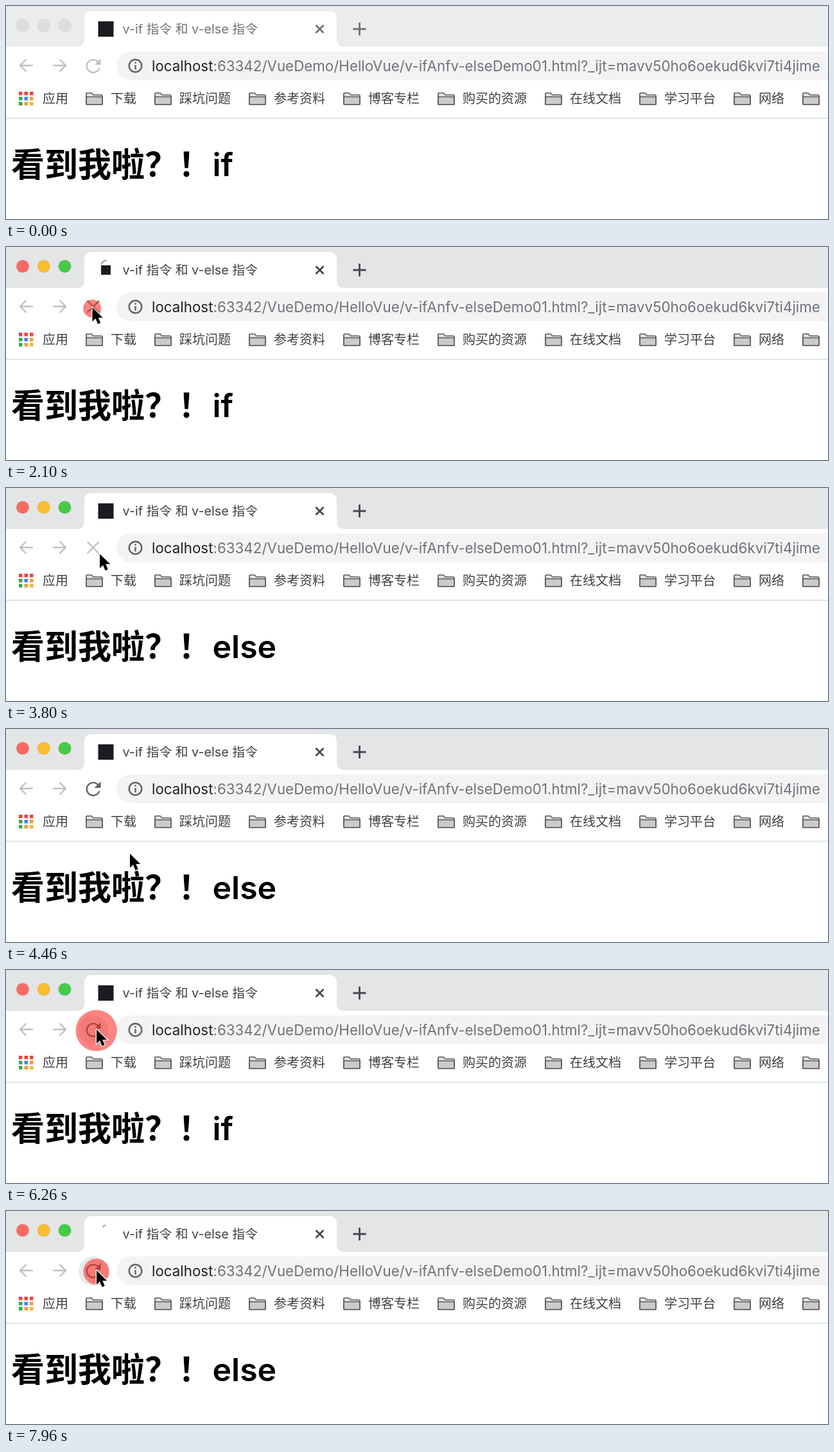
Recreate the animation shown at these times as an HTML page. Size 1280x333 px, loop 8000 ms.

```html
<!DOCTYPE html>
<html lang="zh-CN">
<head>
<meta charset="utf-8">
<title>v-if / v-else</title>
<style>
  html, body { margin: 0; width: 100%; height: 100%; overflow: hidden; background: #fff; }
  svg { display: block; font-family: Inter, "Noto Sans CJK SC", "Noto Sans CJK", sans-serif; }
  text { white-space: pre; }
  .line { fill: none; stroke-width: 2.4; }
  #strip { fill: #ebecee; }
  .light { fill: #dcdddf; stroke: #0001; }
  #tabText { fill: #717376; }
  #tabIcons { stroke: #717376; stroke-width: 2.8; }
  .active #strip { fill: #e4e5e7; }
  .active .light { fill: var(--on); }
  .active #tabText { fill: #3e4145; }
  .active #tabIcons { stroke: #45484c; }
</style>
</head>
<body>
<svg id="stage" width="1280" height="333" viewBox="0 0 1280 333">
  <rect id="strip" width="1280" height="64"/>
  <circle class="light" style="--on:#f96b62" cx="26" cy="30.2" r="9.8"/>
  <circle class="light" style="--on:#fabd2f" cx="58.8" cy="30.2" r="9.8"/>
  <circle class="light" style="--on:#46ca48" cx="91.5" cy="30.2" r="9.8"/>
  <path fill="#fff" d="M110 64q12 0 12-12V20q0-12 12-12H503q12 0 12 12V52q0 12 12 12z"/>
  <rect id="favicon" x="143.5" y="24" width="24" height="24" fill="#1b1b20"/>
  <path id="spinner" class="line" stroke="#a9abae" d="M151 24.9A12 12 0 1 1 150.9 25"/>
  <text id="tabText" x="181.5" y="42.5" font-size="19.8">v-if 指令 和 v-else 指令</text>
  <path id="tabIcons" class="line" d="M482.5 30l12 12m0-12l-12 12M550.5 26v20m-10-10h20"/>

  <g class="line" stroke="#bfc0c2">
    <path d="M42 93H22M31.5 83.5L22 93l9.5 9.5"/>
    <path d="M73 93H93M83.5 83.5L93 93l-9.5 9.5"/>
  </g>
  <circle id="hover" cx="136" cy="94" r="23" fill="#e9eaec"/>
  <g id="reload">
    <path class="line" stroke="currentColor" d="M143.5 87.5A10 10 0 1 0 145.3 97"/>
    <path fill="currentColor" d="M147.5 82V92H137.5z"/>
  </g>
  <path id="stop" class="line" stroke="currentColor" d="M126.5 84l18.5 18.5m0-18.5l-18.5 18.5"/>
  <rect x="172" y="71" width="1140" height="45" rx="22.5" fill="#f3f3f4"/>
  <circle class="line" stroke="#5f6368" cx="201.5" cy="93.5" r="9.8"/>
  <path class="line" stroke="#5f6368" d="M201.5 87.5v2.5m0 2.3v7"/>
  <text x="227" y="101.5" font-size="22.35" fill="#6f7378"><tspan fill="#202124">localhost</tspan>:63342/VueDemo/HelloVue/v-ifAnfv-elseDemo01.html?_ijt=mavv50ho6oekud6kvi7ti4jime</text>

  <g id="bookmarks" font-size="20" fill="#3c4043">
    <text x="57" y="152">应用</text>
  </g>
  <path d="M0 175.5H1280" stroke="#d8d9db" stroke-width="1.7"/>

  <g font-weight="700">
    <text x="8" y="267" font-size="52" font-family="'Noto Sans CJK SC','Noto Sans CJK',sans-serif">看到我啦？！</text>
    <text id="branch" x="321.5" y="266" font-size="50" font-weight="600">if</text>
  </g>
  <circle id="ripple" fill="#fa2823" fill-opacity=".57"/>
  <path id="cursor" d="M0 0V22l5-4.7 3.5 8.6 4.2-1.8-3.5-8.2h7z" stroke="#fff" stroke-width="2.4" paint-order="stroke"/>
</svg>
<script>
const LOOP = 8000, GROW = 60, SHRINK = 660, MAX_R = 40;
const $ = id => document.getElementById(id);
const show = (id, on) => $(id).setAttribute('visibility', on ? 'visible' : 'hidden');
const set = (id, attrs) => { for (const k in attrs) $(id).setAttribute(k, attrs[k]); };

// Cursor tip: time, x, y
const path = [
  [740, 205, 298], [860, 190, 191], [1100, 190, 191], [1540, 134.5, 94.5],
  [3640, 134.5, 94.5], [3800, 146, 103], [4460, 193, 195], [4620, 193, 195],
  [4740, 149, 93], [5780, 149, 93], [6020, 141, 93], [LOOP, 141, 93]
];
const clicks = [1680, 2988, 4750, 6100, 7020, 7635];
const loads = [[1940, 2640], [4990, 5400], [6330, 6640], [7240, 7600], [7940, LOOP]];

function buildBookmarks() {
  const icons = ['#e8453c', '#e8453c', '#e8453c', '#36a853', '#4285f4', '#f29b38', '#36a853', '#f29b38', '#f5b932'];
  let html = icons.map((c, i) =>
    `<rect x="${20 + i % 3 * 8.5}" y="${134 + (i / 3 | 0) * 8}" width="5.5" height="5.5" fill="${c}"/>`).join('');
  let x = 124;
  for (const name of ['下载', '踩坑问题', '参考资料', '博客专栏', '购买的资源', '在线文档', '学习平台', '网络', '技术']) {
    html += `<g transform="translate(${x} 135)" stroke="#58595b" stroke-width="1.7" fill="#e2e2e2">
      <path d="M1 18V2q0-1 1-1h7l3 3h12q2 0 2 2V18q0 1-1 1H2q-1 0-1-1z"/>
      <path fill="#cbcbcb" d="M1 7H26V18q0 1-1 1H2q-1 0-1-1z"/></g>
      <text x="${x + 39}" y="152">${name}</text>`;
    x += 67 + name.length * 20;
  }
  $('bookmarks').insertAdjacentHTML('beforeend', html);
}

function cursorAt(t) {
  const i = Math.max(1, path.findIndex(p => p[0] > t));
  const [t0, x0, y0] = path[i - 1], [t1, x1, y1] = path[i];
  const p = Math.max(0, (t - t0) / (t1 - t0));
  return [x0 + (x1 - x0) * p, y0 + (y1 - y0) * p];
}

function rippleRadius(t) {
  const age = t - clicks.filter(c => c <= t).pop();
  if (!(age < GROW + SHRINK)) return 0;
  return age < GROW ? MAX_R * age / GROW : MAX_R * (1 - (age - GROW) / SHRINK) ** 1.32;
}

function draw(t) {
  const active = t >= 1690, stopping = t >= 1980 && t < 3900;
  const [x, y] = cursorAt(t);
  $('stage').classList.toggle('active', active);

  show('cursor', t >= 740);
  set('cursor', { transform: `translate(${x} ${y})` });
  set('ripple', { cx: x - .3, cy: y + 1.7, r: rippleRadius(t) });

  show('hover', active && !stopping && Math.hypot(x - 136, y - 94) < 23);
  show('reload', !stopping);
  show('stop', stopping);
  set('reload', { color: active ? '#5f6368' : '#bfc0c2' });
  set('stop', { color: t < 2600 ? '#5f6368' : '#bfc0c2' });

  const load = loads.find(([a, b]) => t >= a && t < b);
  const age = load ? t - load[0] : 0;
  show('spinner', load);
  show('favicon', !load || age > 60);
  set('favicon', { transform: load ? 'translate(155.5 36) scale(.62) translate(-155.5 -36)' : '' });
  set('spinner', {
    'stroke-dasharray': `${Math.min(10, 4 + age / 20)} 99`,
    transform: `rotate(${-age * .09} 155.5 36)`
  });

  $('branch').textContent = t < 2300 || (t >= 5250 && t < 6480) ? 'if' : 'else';
}

buildBookmarks();
const start = performance.now();
function tick() {
  draw((performance.now() - start) % LOOP);
  requestAnimationFrame(tick);
}
tick();
</script>
</body>
</html>
```
